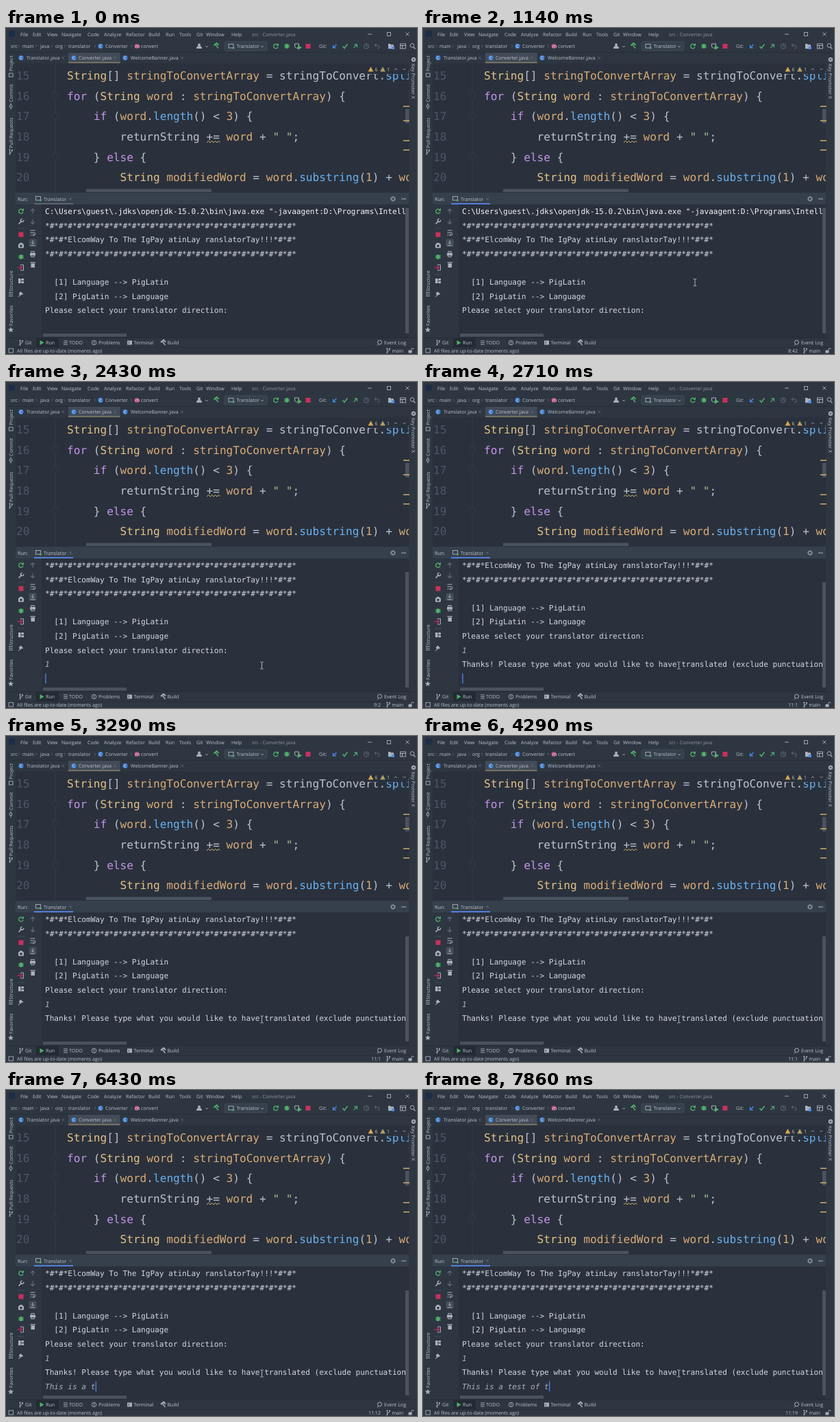
Animation, 600 px wide and 475 px high, one loop 8000 ms. Source, as an HTML page:

```html
<!DOCTYPE html>
<html lang="en">
<head>
<meta charset="utf-8">
<title>Translator console</title>
<style>
  html, body { margin: 0; width: 600px; height: 475px; overflow: hidden; background: #2e3641; }
  svg { display: block; }
  text { white-space: pre; text-rendering: geometricPrecision; }
  .ui { font: 7.1px "Open Sans", "Noto Sans", sans-serif; }
  .code { font: 16.1px "DejaVu Sans Mono", monospace; }
  .out { font: 11.08px "DejaVu Sans Mono", monospace; }
  .typed { font-style: italic; }
</style>
</head>
<body>
<svg id="stage" width="600" height="475" viewBox="0 0 600 475"></svg>
<script>
const C = {
  bar: '#2e3641', pane: '#2a313c', head: '#36404c', edge: '#272e38', faint: '#38414d',
  text: '#bcc3ce', dim: '#626b79', icon: '#a9b1be', thumb: '#4b535f',
  green: '#4fb06a', red: '#c9305c', blue: '#4a8df0', yellow: '#e3c288', orange: '#d9ab77',
  purple: '#c593ea', string: '#9fc589', method: '#69b0ef', mark: '#d9b472'
};
const ROW = 20.55, CHAR = 6.67, LEFT = 57, LOOP = 8000, FPS = 7;

const esc = s => s.replace(/&/g, '&amp;').replace(/</g, '&lt;').replace(/>/g, '&gt;');
const rect = (x, y, w, h, fill, more = '') =>
  `<rect x="${x}" y="${y}" width="${w}" height="${h}" fill="${fill}" ${more}/>`;
const text = (x, y, s, fill = C.text, cls = 'ui', more = '') =>
  `<text x="${x}" y="${y}" fill="${fill}" class="${cls}" ${more}>${esc(s)}</text>`;
const line = (d, color = C.icon, w = 1, more = '') =>
  `<path d="${d}" fill="none" stroke="${color}" stroke-width="${w}" ${more}/>`;
const fill = (d, color = C.icon) => `<path d="${d}" fill="${color}"/>`;
const dot = (x, y, r, color) => `<circle cx="${x}" cy="${y}" r="${r}" fill="${color}"/>`;
const ring = (x, y, r, color = C.icon) =>
  `<circle cx="${x}" cy="${y}" r="${r}" fill="none" stroke="${color}"/>`;
const box = (x, y, w, h) => rect(x, y, w, h, 'none', `stroke="${C.icon}" stroke-width=".9"`);
const cross = (x, y, r = 2, color = C.dim) =>
  line(`M${x - r} ${y - r}l${2 * r} ${2 * r}m0 ${-2 * r}l${-2 * r} ${2 * r}`, color, .8);
const words = (y, list, color) => list.map(([x, s]) => text(x, y, s, color)).join('');
const side = (x, y, s, turn) =>
  text(0, 0, s, C.text, 'ui', `transform="translate(${x} ${y}) rotate(${turn})"`);

// Icons
const fileIcon = (x, y) => dot(x, y, 3.7, '#3b78c4') +
  line(`M${x + 1.5} ${y - 1.2}a1.9 1.9 0 1 0 0 2.4`, '#d5e4f7', .8);
const rerun = (x, y) => line(`M${x + 3} ${y + 1}a3.2 3.2 0 1 1 -1 -3.4`, C.green, 1.3) +
  fill(`M${x + 4} ${y - 4.5}v4h-4z`, C.green);
const bug = (x, y) => `<ellipse cx="${x}" cy="${y + .5}" rx="2.5" ry="3.4" fill="${C.green}"/>` +
  line(`M${x - 4} ${y - 2}l8 5m0 -5l-8 5M${x - 4} ${y + .5}h8`, C.green, .9);
const hammer = (x, y, c) => line(`M${x - 3.5} ${y - .5}l4 -3.5l3 3`, c, 2) +
  line(`M${x - 1} ${y - 1.5}l4 5`, c, 1.5);
const wrench = (x, y) => line(`M${x - 3.5} ${y + 3.5}l4.5 -4.5`, C.icon, 1.7) +
  line(`M${x + 3.6} ${y - 2.2}a2.2 2.2 0 1 1 -1.8 -1.6`, C.icon, 1.4);
const arrow = (x, y, turn, c) =>
  line('M-3.5 0h7m-3 -3l3 3l-3 3', c, 1.2, `transform="translate(${x} ${y}) rotate(${turn})"`);
const play = (x, y) => fill(`M${x - 2.5} ${y - 3.5}l6 3.5l-6 3.5z`, C.green);
const branch = (x, y) => line(`M${x - 1.5} ${y - 3}v6M${x + 2} ${y - 2}q0 3 -3.5 3`, C.icon, .9) +
  dot(x - 1.5, y - 3, 1.1, C.icon) + dot(x - 1.5, y + 3, 1.1, C.icon) + dot(x + 2, y - 2.4, 1.1, C.icon);
const rows = (x, y) => line(`M${x - 3} ${y - 2.5}h6m-6 2.5h6m-6 2.5h6`, C.icon, .9);
const chevron = (x, y, s = 1) => line(`M${x - 2} ${y - s}l2 ${2 * s}l2 ${-2 * s}`, C.icon, .8);
const warn = (x, y, c) => fill(`M${x} ${y - 3.5}l3.8 7h-7.6z`, c);

function header() {
  const menu = [[21, 'File'], [39, 'Edit'], [60, 'View'], [81, 'Navigate'], [119, 'Code'], [143, 'Analyze'],
    [175, 'Refactor'], [208, 'Build'], [233, 'Run'], [253, 'Tools'], [278, 'Git'], [292, 'Window'], [329, 'Help']];
  const path = [[7, 'src'], [24, 'main'], [50, 'java'], [72, 'org'], [91, 'translator'], [145, 'Converter'], [197, 'convert']];
  return rect(4, 4, 9, 9, '#1d2c47') + words(11.5, menu) + text(359, 11.5, 'src - Converter.java', '#8f98a6') +
    line('M528 9h6M583.5 6.5l5 5m0 -5l-5 5', C.text, .8) + box(556.5, 6.5, 5, 5) +
    words(29.2, path) + [19, 44, 67, 86, 130, 183].map(x => line(`M${x - 1} 24.5l2 2l-2 2`, C.dim, .8)).join('') +
    fileIcon(138, 26.5) + dot(191, 26.5, 3.6, '#b0527e') + text(188.8, 28.8, 'm', '#f0dbe5') +
    dot(282, 24.4, 1.9, C.icon) + fill('M278 30q0 -4 4 -4t4 4z') + chevron(293, 27) + hammer(307, 26, C.green) +
    rect(319, 20, 62, 13, C.head, 'stroke="#414b58" rx="2"') + box(325, 23.5, 7, 5.5) +
    dot(332, 29, 1.5, C.green) + text(336.5, 29.2, 'Translator') + chevron(374, 27) +
    rerun(394, 26.5) + bug(410, 26) + line('M421.5 23h6v4.5l-3 2l-3 -2z', C.icon) + play(428.5, 28.5) +
    rect(437.5, 23, 7, 7, C.red) + text(457, 29.2, 'Git:') +
    arrow(480, 26.5, 135, C.blue) + line('M491.5 26.5l2.5 3l4.5 -6', C.green, 1.5) + arrow(510, 26.5, -45, C.green) +
    ring(526, 26.5, 3.6, C.dim) + line('M526 24v2.5h2', C.dim) +
    line('M538.5 25h4q2.5 0 2.5 2.5t-2.5 2.5M540.5 22.5l-2.5 2.5l2.5 2.5', C.dim) +
    fill('M558 23h3l1 1.2h4v6h-8z') + rect(563, 27, 4, 4, C.blue) +
    box(575.5, 23, 8, 7) + line('M575.5 25.5h8M578.5 25.5v4.5') + ring(593, 25.5, 2.8) + line('M595 28l2.5 2.5', C.icon, 1.2) +
    line('M0 35.5h600', C.edge);
}

function tabs() {
  return rect(91, 36, 75.5, 15, '#424b57') + rect(91, 49.5, 75.5, 2, '#817d68') +
    [22, 99, 174].map(x => fileIcon(x, 43.5)).join('') +
    words(46.2, [[30, 'Translator.java'], [106, 'Converter.java'], [182, 'WelcomeBanner.java']]) +
    [83, 159, 257].map(x => cross(x, 43.5)).join('');
}

function stripes() {
  return side(9.5, 63, 'Project', -90) + box(4.5, 66, 5.5, 5) + side(9.5, 108, 'Commit', -90) +
    ring(7, 114, 2) + line('M7 109.5v2.5m0 4v2.5') + side(9.5, 175, 'Pull Requests', -90) + branch(7, 180.5) +
    side(9.5, 384, 'Structure', -90) + rows(7, 388) + side(9.5, 434, 'Favorites', -90) +
    fill('M7 435.5l1.2 3h3l-2.4 1.9l.9 3l-2.7 -1.8l-2.7 1.8l.9 -3l-2.4 -1.9h3z') +
    side(592, 52, 'Key Promoter X', 90) + dot(595, 46, 3.2, C.icon) + cross(595, 46, 1.5, C.bar);
}

function editor() {
  const k = C.purple, t = C.yellow, v = C.orange, p = C.text, m = C.method, s = C.string;
  const src = [
    [0, [t, 'String'], [p, '[] '], [v, 'stringToConvertArray'], [p, ' = stringToConvert.'], [m, 'split']],
    [0, [k, 'for '], [p, '('], [t, 'String '], [v, 'word'], [p, ' : '], [v, 'stringToConvertArray'], [p, ') {']],
    [4, [k, 'if '], [p, '('], [v, 'word'], [p, '.'], [m, 'length'], [p, '() < '], [v, '3'], [p, ') {']],
    [8, [p, 'returnString += '], [v, 'word'], [p, ' + '], [s, '" "'], [p, ';']],
    [4, [p, '} '], [k, 'else'], [p, ' {']],
    [8, [t, 'String '], [v, 'modifiedWord'], [p, ' = '], [v, 'word'], [p, '.'], [m, 'substring'], [p, '('], [v, '1'], [p, ') + '], [v, 'word']]
  ];
  const body = src.map(([indent, ...parts], i) => {
    const y = 74.8 + 29.7 * i;
    const spans = parts.map(([c, w]) => `<tspan fill="${c}">${esc(w)}</tspan>`).join('');
    return text(15, y, String(15 + i), '#4d5767', 'code') +
      `<text class="code" x="${89 + indent * 9.69}" y="${y}">${spans}</text>`;
  }).join('');
  const folds = [99, 128, 188].map(y =>
    `<path d="M68 ${y - 5}h8v6.5l-4 4l-4 -4z" fill="${C.pane}" stroke="${C.faint}" stroke-width=".8"/>`).join('');
  const ticks = [113.5, 134.5, 163.5, 177].map(y => rect(580, y, 9, 1.4, C.mark)).join('');
  return rect(14, 51.5, 574, 189, C.pane) + line('M72 51.5v189', C.faint, .8) + folds +
    `<g clip-path="url(#edit)">${body}</g>` +
    line('M293 167l2.5 -2.5l2.5 2.5l2.5 -2.5l2.5 2.5l2.5 -2.5l2.5 2.5l2.5 -2.5l2 2', C.mark) +
    rect(525, 53, 62, 14, C.pane) + warn(532.5, 60, '#d9a94f') + text(538.5, 62.8, '6') +
    warn(550, 60, '#b3a068') + text(556, 62.8, '1') + chevron(569, 60, -1) + chevron(581.5, 60) +
    rect(583, 118, 5.5, 21, C.thumb) + ticks + rect(117, 234.5, 183, 4.5, C.thumb);
}

function runPane() {
  const x = 22, u = 39;
  return rect(14, 240, 574, 17, C.head) + text(17, 251.5, 'Run:') +
    box(43.5, 245.5, 7, 5.5) + dot(50.5, 251, 1.5, C.green) +
    text(55, 251.5, 'Translator') + cross(94, 249) + rect(41, 255.3, 57, 1.8, C.dim, 'id="focus"') +
    ring(565, 249, 2.4) + line('M565 245v1.5m0 5v1.5m-4 -4h1.5m5 0h1.5m-6.8 -2.8l1 1m3.6 3.6l1 1m0 -5.6l-1 1m-3.6 3.6l-1 1') +
    line('M577 249h7') + rect(52, 257, 536, 194, C.pane) +
    rerun(x, 267) + wrench(x, 282) + line('M17 292h10', '#434c59') +
    rect(18.5, 297.5, 7, 7, C.red) + rect(18, 314.5, 8, 6, C.icon, 'rx="1"') + dot(x, 317.5, 1.8, C.bar) + rect(20, 313, 4, 2, C.icon) +
    bug(x, 333) + line('M21 345h4.5v8h-4.5') + arrow(20, 349, 0, C.red) + line('M17 359h10', '#434c59') +
    rect(18, 365, 3.6, 7, C.icon) + rect(22.4, 365, 3.6, 3, C.icon) + rect(22.4, 369, 3.6, 3, C.icon) +
    fill('M21.5 384l4 4l-3.2 .8l-1.8 1.8l-1.6 -4z') + line('M21 388.5l-3 3.5') +
    arrow(u, 267, -90, C.dim) + arrow(u, 282, 90, C.dim) +
    line('M35.5 295h7M35.5 298.3h5.5q2 0 2 1.7t-2 1.7h-2m1.5 -1.5l-1.5 1.5l1.5 1.5M35.5 301.7h2') +
    rect(33.5, 307.5, 11, 11, '#434c59', 'rx="1.5"') + line('M35.5 317h7M39 309.5v5m-2 -2l2 2l2 -2') +
    rect(35, 328, 8, 3.5, C.icon) + box(36.8, 325.5, 4.4, 2.5) + box(36.8, 330.5, 4.4, 3) +
    rect(36.5, 343, 5.5, 6, C.icon) + rect(35.5, 341, 7.5, 1.2, C.icon);
}

function footer() {
  return rect(0, 451, 600, 1, C.edge) + rect(44, 452, 33, 13, '#242b34') + branch(22, 458.5) + play(52, 458.5) + rows(87, 458.5) +
    ring(128.5, 458.5, 3.2) + line('M128.5 456.5v2.5m0 .6v1') + rect(177, 455.5, 7, 6, C.icon) + line('M178.5 457l1.5 1.5l-1.5 1.5', C.bar) +
    hammer(229.5, 458.5, C.icon) + ring(545.5, 458, 3) + line('M543.5 460.5l-1.5 2') +
    words(461.2, [[28, 'Git'], [58, 'Run'], [92, 'TODO'], [135, 'Problems'], [186.5, 'Terminal'], [235.5, 'Build'], [552, 'Event Log']]) +
    rect(0, 465, 600, .8, C.edge) + box(4, 467, 6.5, 6) + text(16, 472.8, 'All files are up-to-date (moments ago)') +
    branch(558, 470) + text(563.5, 472.8, 'main') + rect(587.5, 469.5, 5, 4, C.icon) + line('M592 469.5v-1.5q0 -1.5 1.7 -1.5t1.7 1.5', C.icon, .9);
}

const stars = '*#'.repeat(27) + '*';
const output = [
  'C:\\Users\\guest\\.jdks\\openjdk-15.0.2\\bin\\java.exe "-javaagent:D:\\Programs\\IntelliJ',
  stars, '*#*#*ElcomWay To The IgPay atinLay ranslatorTay!!!*#*#*', stars, '',
  '  [1] Language --> PigLatin', '  [2] PigLatin --> Language', 'Please select your translator direction: ',
  '1', 'Thanks! Please type what you would like to have translated (exclude punctuation):', ''
];
const phrase = 'This is a test of t';
function outText(s, i) {
  const isInput = i === 8 || i === 10;
  const color = isInput ? '#aab2be' : i ? '#d3d8e0' : '#f2f4f7';
  return text(LEFT, 271.3 + i * ROW, s, color, isInput ? 'out typed' : 'out', `id="row${i}"`);
}

const stage = document.getElementById('stage');
stage.innerHTML =
  `<defs><clipPath id="edit">${rect(14, 51, 574, 189, '#000')}</clipPath>` +
  `<clipPath id="term">${rect(52, 258, 536, 187, '#000')}</clipPath></defs>` +
  rect(0, 0, 600, 475, C.bar) + header() + tabs() + stripes() + editor() + runPane() + footer() +
  `<g clip-path="url(#term)"><g id="lines">${output.map(outText).join('')}` +
  rect(0, 0, 1.2, 14.5, '#528bff', 'id="caret"') + '</g></g>' +
  rect(583, 0, 5, 0, C.thumb, 'id="thumb"') + rect(54, 445.3, 122, 4.5, C.thumb) +
  text(547, 472.8, '', C.text, 'ui', 'id="status" text-anchor="end"') +
  `<g id="mouse">${line('M-2.3 -5h1.6l.7 .6l.7 -.6h1.6M0 -4.5v9M-2.3 5h1.6l.7 -.6l.7 .6h1.6', '#d5d9e0', .8)}</g>`;

const [lines, caret, thumb, status, mouse, focus, answer, thanks, input] =
  ['lines', 'caret', 'thumb', 'status', 'mouse', 'focus', 'row8', 'row9', 'row10'].map(id => document.getElementById(id));

// Each track is [tick, value]; a value holds until the next tick.
const scroll = [[0, 0], [17, 1], [18, 2]];
const typed = [[0, 0], [39, 1], [40, 2], [41, 4], [42, 7], [43, 9], [44, 11], [46, 12], [48, 13], [49, 14],
  [51, 15], [52, 16], [53, 17], [54, 18], [55, 19]];
const blink = [[0, 0], [2, 1], [6, 0], [9, 1], [15, 0], [17, 1], [23, 0], [26, 1], [29, .5], [30, 0], [33, 1], [37, 0], [39, 1]];
const place = [[0, ''], [2, '8:42'], [12, '9:2'], [19, '11:1']];
const at = (track, n) => track.filter(([tick]) => tick <= n).pop()[1];
const show = (el, on) => el.setAttribute('visibility', on ? 'visible' : 'hidden');

function draw(n) {
  const up = at(scroll, n), count = at(typed, n);
  const [row, col] = n < 11 ? [7, 41] : n < 17 ? [8, 1] : n < 18 ? [9, 0] : [10, count];
  lines.setAttribute('transform', `translate(0 ${-up * ROW})`);
  show(answer, n >= 11);
  show(thanks, n >= 18);
  input.textContent = phrase.slice(0, count);
  caret.setAttribute('x', LEFT + .3 + col * CHAR);
  caret.setAttribute('y', 260.3 + row * ROW);
  caret.setAttribute('opacity', at(blink, n));
  thumb.setAttribute('y', 262 + up * 15);
  thumb.setAttribute('height', 183 - up * 15);
  focus.setAttribute('fill', n < 2 ? C.dim : '#568af2');
  status.textContent = n >= 40 ? '11:' + (at(typed, n - 1) + 1) : at(place, n);
  const k = 1 - (1 - Math.min(1, Math.max(0, (n - 4) / 6))) ** 2;
  mouse.setAttribute('transform', `translate(${585 - 211.5 * k} ${33 + 380 * k})`);
  show(mouse, n >= 4);
}

let start, last = -1;
function frame(now) {
  start ??= now;
  const n = Math.floor(((now - start) % LOOP) * FPS / 1000 + .05) % 56;
  if (n !== last) draw(last = n);
  requestAnimationFrame(frame);
}
draw(0);
requestAnimationFrame(frame);
</script>
</body>
</html>
```
